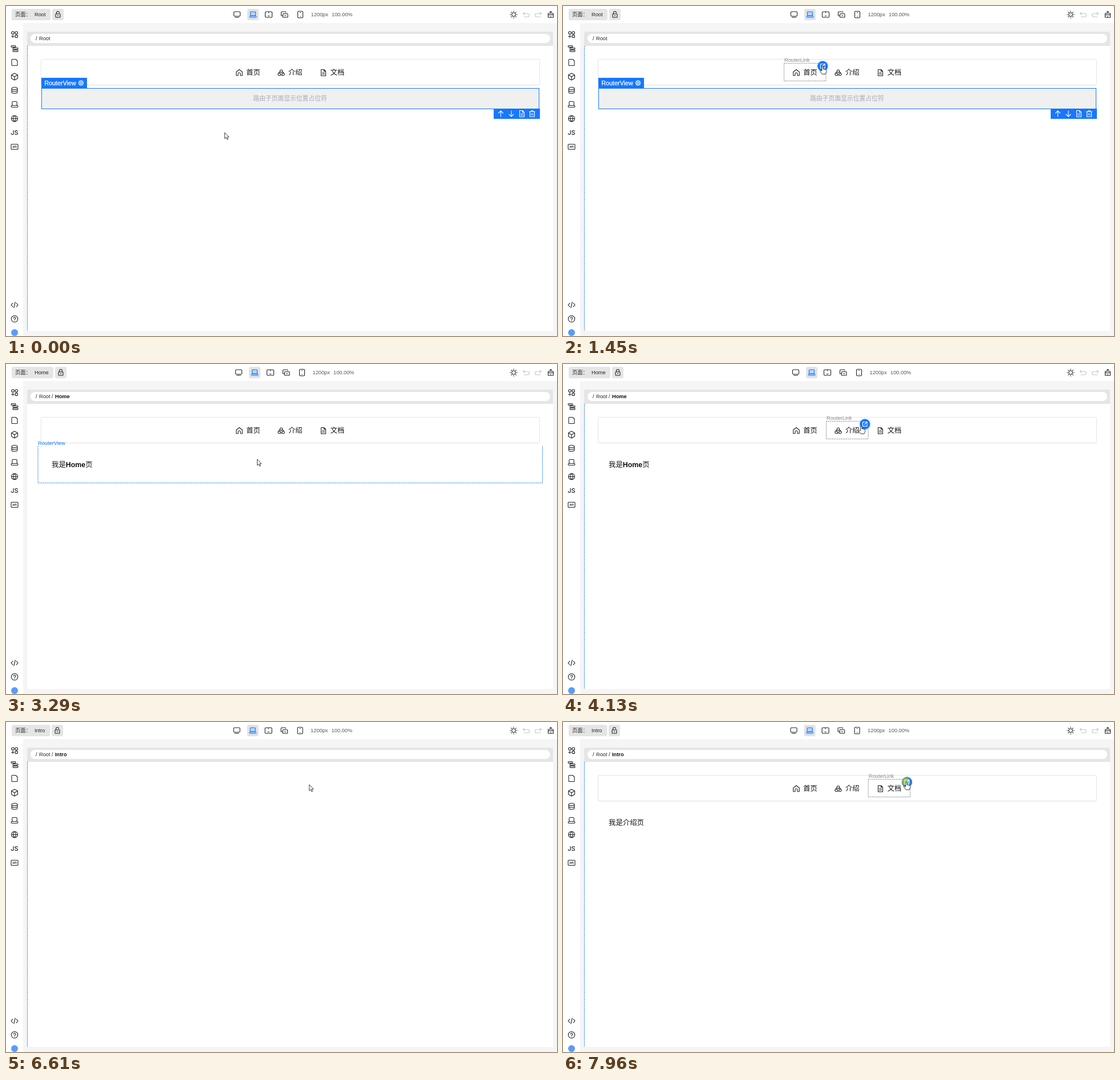
An HTML page for the animation above (8 s loop, 966 px wide and 579 px high).

```html
<!DOCTYPE html>
<html lang="zh">
<head>
<meta charset="utf-8">
<style>
html, body { margin: 0; width: 100%; height: 100%; overflow: hidden; background: #fff; }
svg { display: block; width: 100%; height: 100%; }
text { font: 9.25px "Liberation Sans", "Noto Sans CJK SC", "Noto Sans CJK", sans-serif; fill: #222; white-space: pre; }
.icon { fill: none; stroke: #222; stroke-width: 1.1; stroke-linejoin: round; stroke-linecap: round; }
.white { stroke: #fff; }
.pale { stroke: #c4c6ca; }
.nav { font-size: 12.3px; fill: #111; }
.dash { fill: none; stroke: currentColor; stroke-dasharray: 2 1.2; }
.blue { fill: #1677ff; }
.bold { font-weight: bold; fill: #111; }
</style>
</head>
<body>
<svg id="stage" viewBox="0 0 966 579"></svg>
<script>
const BLUE = '#1677ff';
const icon = (x, y, d, cls = '') => `<path class="icon ${cls}" transform="translate(${x} ${y})" d="${d}"/>`;
const rect = (x, y, w, h, fill, more = '') => `<rect x="${x}" y="${y}" width="${w}" height="${h}" fill="${fill}" ${more}/>`;
const text = (x, y, s, more = '') => `<text x="${x}" y="${y}" ${more}>${s}</text>`;
const group = (id, body) => `<g id="${id}">${body}</g>`;
const ring = (x, y, r) => `M${x - r} ${y}a${r} ${r} 0 1 0 ${2 * r} 0a${r} ${r} 0 1 0 ${-2 * r} 0`;
const box = (x, y, w, h, r = 1) =>
  `M${x + r} ${y}h${w - 2 * r}q${r} 0 ${r} ${r}v${h - 2 * r}q0 ${r} ${-r} ${r}h${2 * r - w}q${-r} 0 ${-r} ${-r}v${2 * r - h}q0 ${-r} ${r} ${-r}z`;
const rays = (n, r1, r2) => Array.from({ length: n }, (_, i) => {
  const c = Math.cos(i * 2 * Math.PI / n), s = Math.sin(i * 2 * Math.PI / n);
  return `M${(c * r1).toFixed(2)} ${(s * r1).toFixed(2)}L${(c * r2).toFixed(2)} ${(s * r2).toFixed(2)}`;
}).join('');

const doc = 'M-4-5.5H1L4-2.5V5.5H-4zM1-5.5V-2.5H4M-2 0H2M-2 2.5H2';
const external = 'M-.5-3.8H-3.8V3.8H3.8V.5M1-3.8H3.8V-1M3.8-3.8L-.5.5';

const sideIcons = [
  [50, ring(-3, -3, 2.3) + ring(3.2, -3, 2.3) + ring(3.2, 3.2, 2.3) + 'M-5.5 3.2H-.7M-3 .8V5.6'],
  [74.5, box(-6, -5, 8, 2.6) + box(-3, -1.2, 9, 2.6) + box(-3, 2.8, 9, 2.6)],
  [99, 'M-4-5.5H2L5-2.5V4.5Q5 5.5 4 5.5H-4Q-5 5.5-5 4.5V-4.5Q-5-5.5-4-5.5z'],
  [124, 'M0-6L5.5-3V3L0 6L-5.5 3V-3zM-5.5-3L0 0L5.5-3M0 0V6'],
  [148, 'M-5-3.3a5 2.2 0 0 0 10 0a5 2.2 0 0 0-10 0V3.3a5 2.2 0 0 0 10 0V-3.3M-5 0a5 2.2 0 0 0 10 0'],
  [172.5, box(-4.2, -5, 8.4, 7, 1.5) + box(-5.8, 2, 11.6, 3, 1)],
  [197.5, ring(0, 0, 5.5) + 'M-5.5 0H5.5M0-5.5C-3.2-2.5-3.2 2.5 0 5.5C3.2 2.5 3.2-2.5 0-5.5'],
  [247, box(-6, -4.5, 12, 9, 1)],
  [524.5, 'M-3.2-3.2L-6 0L-3.2 3.2M3.2-3.2L6 0L3.2 3.2M1.2-5L-1.2 5'],
  [549, ring(0, 0, 5.7) + 'M-1.8-1.2C-1.8-3.7 1.8-3.5 1.8-1.2C1.8.2 0 0 0 1.5M0 3.2V3.4']
];

const deviceIcons =
  icon(405, 15, box(-5.5, -5, 11, 8, 1.5) + 'M-3.5 5H3.5') +
  rect(423, 5, 20, 20, '#e3e3e3', 'rx="3"') +
  `<g style="stroke:${BLUE}">` + rect(428.5, 10, 9, 7, '#b9d6ff', 'rx="1" stroke-width="1.2"') +
  rect(427, 17.5, 12, 2.5, '#b9d6ff', 'rx="1"') + '</g>' +
  icon(460.5, 15, box(-6, -5, 12, 10, 1.5) + 'M0-5V-3M-1.2 2.5H1.2') +
  icon(488, 15, 'M-5.5 2V-3.5Q-5.5-5 -4-5H1.5Q3-5 3-3.5M-5.5 2H-3' + box(-2.5, -1.5, 8.5, 6.5) + 'M.5 2H3') +
  icon(516, 15, box(-4.5, -5.7, 9, 11.4, 1.5) + 'M-.5-3.5H.5M0 3V3.4') +
  text(534.5, 18.4, '1200px', 'style="fill:#555"') + text(571, 18.4, '100.00%', 'style="fill:#555"');

const chrome =
  rect(0, 0, 966, 579, '#fff') + rect(30, 30, 936, 549, '#f5f5f5') +
  rect(10, 5, 68, 20, '#e5e5e5', 'id="pill" rx="3"') + text(16, 18.4, '页面：') + text(50, 18.4, '', 'id="pageName"') +
  group('lock', rect(0, 5, 20, 20, '#e5e5e5', 'rx="3"') +
    icon(10, 15, box(-4, -1.2, 8, 6.2, 1) + 'M0 1V2.5') +
    icon(10, 15, 'M-2.5-1.2V-3A2.5 2.5 0 0 1 2.5-3', 'open') +
    icon(10, 15, 'M2.5-3V-1.2', 'shackle')) +
  group('devices', deviceIcons) +
  icon(890, 15, ring(0, 0, 3.2) + rays(8, 5, 6.2)) +
  icon(912, 15, 'M-3-4L-5.5-1.8L-3 .4M-5.5-1.8H3Q5.5-1.8 5.5 1Q5.5 4 3 4H-4', 'pale') +
  icon(933, 15, 'M3-4L5.5-1.8L3 .4M5.5-1.8H-3Q-5.5-1.8-5.5 1Q-5.5 4-3 4H4', 'pale') +
  icon(955, 15, 'M-1-5.5H1V-2H4.5V5H-4.5V-2H-1zM-4.5.5H4.5M0 5V3') +
  sideIcons.map(([y, d]) => icon(15, y, d)).join('') +
  text(15, 226, 'JS', 'text-anchor="middle" style="font:500 11px Inter,sans-serif"') +
  text(15, 248.7, 'API', 'text-anchor="middle" style="font-size:4.5px;font-weight:bold"') +
  '<circle cx="15" cy="573" r="6" fill="#5b9bf8"/>' +
  '<path d="M37 70V48q0-3 3-3H956q3 0 3 3V70z" fill="#e5e5e5"/>' +
  rect(43, 49, 911, 16, '#fff', 'rx="8"') +
  text(52, 60.4, '/') + text(58, 60.4, 'Root') + text(80, 60.4, '/', 'id="slash"') +
  text(86, 60.4, '', 'id="crumb" class="bold"') +
  rect(37, 70, 922, 500, '#fff');

const content =
  rect(61, 94.5, 875, 45, '#f3f3f3', 'rx="3"') +
  rect(61.5, 93.5, 874, 45, '#fff', 'rx="2" stroke="#e4e4e4"') +
  icon(409, 117, 'M-5.3.5L-5.3-1.2L0-5.5L5.3-1.2V5H2V1.5Q2 0 0 0Q-2 0-2 1.5V5H-5.3z') +
  icon(482.5, 117, ring(0, -2.8, 2.2) + ring(-3.4, 2.8, 2.2) + ring(3.4, 2.8, 2.2) + 'M-2-1.8Q-4.5-.8-4.5 1M2-1.8Q4.5-.8 4.5 1M-1 4.2H1') +
  icon(556.5, 117, doc) +
  ['首页', '介绍', '文档'].map((s, i) => text(421.3 + 73.7 * i, 121.4, s, 'class="nav"')).join('') +
  text(80, 181.4, '', 'id="body" class="nav" style="font-size:12.4px"');

const selection =
  rect(62.5, 144.5, 872, 36, '#f0f0f0', `stroke="${BLUE}"`) +
  text(498, 166.4, '路由子页面显示位置占位符', 'text-anchor="middle" style="font-size:10.8px;fill:#a8abb2"') +
  rect(62, 126, 80, 18.5, BLUE) + text(67.3, 139, 'RouterView', 'style="font-size:10.8px;fill:#fff;stroke:#fff;stroke-width:.25"') +
  icon(131.5, 135, ring(0, 0, 1.6) + ring(0, 0, 3.7) + rays(8, 3.8, 4.6), 'white') +
  rect(855, 180, 81, 18, BLUE) +
  icon(867.5, 189, 'M0 5V-5M-4-1L0-5L4-1', 'white') + icon(886, 189, 'M0-5V5M-4 1L0 5L4 1', 'white') +
  icon(904.5, 189, doc, 'white') +
  icon(922.5, 189, 'M-5-3.5H5M-2-3.5V-5.2H2V-3.5M-4-3.5V5.2H4V-3.5M-1.3-.5V2.5M1.3-.5V2.5', 'white');

const link =
  '<path class="dash" d="M.5 100.5H74V131.5H.5z"/>' +
  text(1, 98.3, 'RouterLink', 'style="fill:currentColor"') +
  group('dropHint', rect(-3, 134, 77, 12, BLUE) + text(-1.5, 143.5, '拖放元素到容器内', 'style="fill:#fff;font-size:9.3px"')) +
  '<circle id="jump" cx="68.3" cy="105.5" r="8.8" stroke-width=".8"/>' +
  group('press', '<circle cx="66.5" cy="104.5" r="7" fill="#84b858"/>') +
  `<path id="jumpIcon" class="icon" transform="translate(68.3 105.5)" d="${external}"/>`;

const $ = id => document.getElementById(id);
$('stage').innerHTML = chrome + group('content', content) + group('selection', selection) +
  `<path id="rootLine" class="dash" color="${BLUE}" d="M37.5 70V570"/>` +
  group('view', `<path class="dash" color="${BLUE}" d="M56 144V208.7H940.5V144"/>` + text(56, 142.3, 'RouterView', 'class="blue"')) +
  group('link', link) +
  group('cursor', '<path id="arrow" d="M.5 0V10.8L3 8.5L4.7 12.3L6.3 11.6L4.7 7.9H8z" fill="#fff" stroke="#111" stroke-width=".8"/>' +
    '<path id="hand" d="M-1.2 8V1Q-1.2 0 0 0Q1.2 0 1.2 1V5Q2.4 4 3.4 5.3Q4.6 4.5 5.2 5.8Q6.8 5.5 6.8 7.2V9.5L5.2 13.5H-.8L-4.4 8.5Q-4.8 7-3.2 7z" fill="#fff" stroke="#111" stroke-width=".8"/>');

// time, x, y of the pointer tip
const pointerPath = [
  [0, 383, 222], [70, 383, 222], [630, 421, 113], [840, 445, 109], [1190, 455, 106], [2380, 455, 106],
  [2520, 443.5, 129], [2940, 440, 167], [3290, 440, 167], [4060, 520, 110], [4270, 528.5, 107],
  [6540, 528.5, 107], [7070, 564.5, 145], [7290, 592, 121], [7560, 602, 105.5], [8000, 602, 105.5]
];
const pages = [
  { from: 0, name: 'Root', pill: 68, lock: 81, shift: 0, body: '' },
  { from: 2050, name: 'Home', pill: 73, lock: 86, shift: 3, body: '我是<tspan class="bold">Home</tspan>页' },
  { from: 6130, name: 'Intro', pill: 67.5, lock: 80, shift: -.4, body: '我是介绍页' }
];
// each link: hovered, pointer on its jump button, pressed, released, left
const hovers = [
  { x: 387, start: 490, button: 910, press: 1390, release: 1450, end: 2050 },
  { x: 461, start: 3780, button: 4130, press: 5400, release: 5530, end: 6130 },
  { x: 534.7, start: 7180, button: 7360, press: 7960, release: 8000, end: 8000 }
];

const within = (t, ...spans) => spans.some(([a, b]) => t >= a && t < b);
const show = (id, on) => { $(id).style.display = on ? '' : 'none'; };
const move = (id, x, y) => $(id).setAttribute('transform', `translate(${x} ${y})`);

function pointerAt(t) {
  const i = pointerPath.findIndex(p => p[0] > t);
  const [t0, x0, y0] = pointerPath[i - 1], [t1, x1, y1] = pointerPath[i];
  const k = (t - t0) / (t1 - t0);
  return [x0 + (x1 - x0) * k, y0 + (y1 - y0) * k];
}

let current;
function setPage(page) {
  if (page === current) return;
  current = page;
  const isRoot = page.name === 'Root';
  $('pill').setAttribute('width', page.pill);
  $('pageName').textContent = page.name;
  $('crumb').textContent = isRoot ? '' : page.name;
  $('body').innerHTML = page.body;
  move('lock', page.lock, 0);
  move('devices', page.shift, 0);
  document.querySelector('.shackle').style.display = page.name === 'Home' ? '' : 'none';
  show('slash', !isRoot);
  show('selection', isRoot);
}

function draw(t) {
  setPage(pages.findLast(p => t >= p.from));
  show('content', !within(t, [2450, 2590], [6610, 6750]));
  show('rootLine', !within(t, [280, 840], [2730, 4060], [6890, 7290]));
  show('view', within(t, [2800, 3640], [6890, 7180]));

  const hover = hovers.find(h => within(t, [h.start, h.end]));
  show('link', hover);
  if (hover) {
    const onButton = t >= hover.button;
    move('link', hover.x, 0);
    $('link').setAttribute('color', onButton ? '#888' : BLUE);
    $('jump').setAttribute('fill', onButton ? BLUE : '#fff');
    $('jump').setAttribute('stroke', onButton ? BLUE : '#ccc');
    $('jumpIcon').style.stroke = onButton ? '#fff' : '#222';
    show('dropHint', !onButton);
    show('press', within(t, [hover.press, hover.release]));
  }
  move('cursor', ...pointerAt(Math.floor(t / 70) * 70));
  show('hand', hover);
  show('arrow', !hover);
}

const start = performance.now();
function frame() {
  draw((performance.now() - start) % 8000);
  requestAnimationFrame(frame);
}
frame();
</script>
</body>
</html>
```
